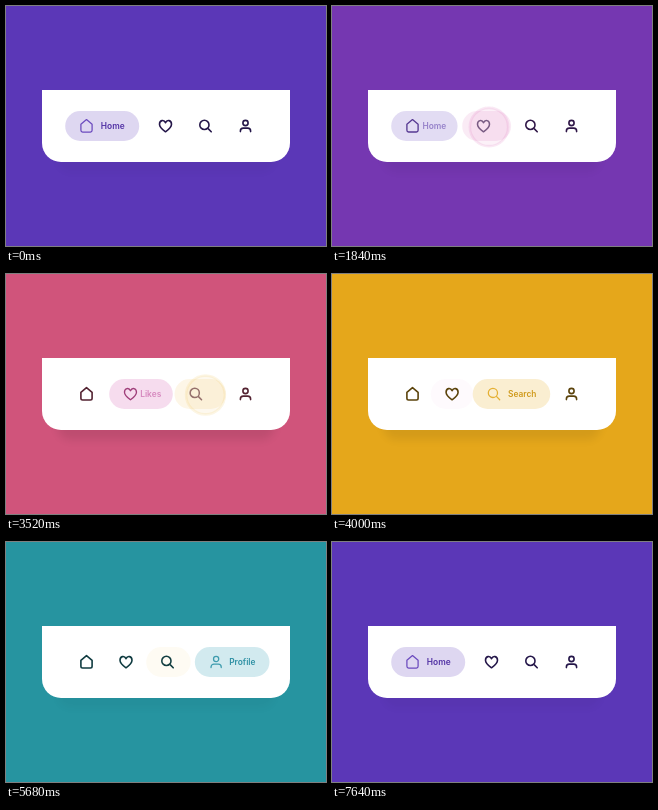
Write an HTML page that moves like this. It is 320 px wide and 240 px high and loops after 8000 ms.

```html
<!DOCTYPE html>
<html lang="en">
<head>
<meta charset="utf-8">
<title>Tab bar</title>
<style>
  html, body { margin: 0; width: 100%; height: 100%; overflow: hidden; }
  svg { display: block; width: 100vw; height: 100vh; }
  text { font: 600 8.4px Inter, "Open Sans", sans-serif; }
  .icon { fill: none; stroke-linecap: round; stroke-linejoin: round; }
</style>
</head>
<body>
<svg viewBox="0 0 320 240">
  <defs>
    <filter id="soft" x="-20%" y="-60%" width="140%" height="220%">
      <feGaussianBlur stdDeviation="4"/>
    </filter>
  </defs>
  <rect id="back" width="320" height="240"/>
  <rect id="shadow" x="51" y="124" width="218" height="42" rx="14" filter="url(#soft)"/>
  <path d="M36 84H284V137a19 19 0 0 1-19 19H55a19 19 0 0 1-19-19Z" fill="#fff"/>
  <g id="pills"></g>
  <circle id="ripple" cy="121" stroke-width="2.6"/>
  <g id="items"></g>
</svg>
<script>
const LOOP = 8000, MOVE = 720, RIPPLE = 450, LEAD = 30;

// Icons are drawn around their own centre.
const tabs = [
  { label: 'Home', rgb: [91, 55, 183], width: 74, shade: .03,
    icon: 'M-5.6-1.7 0-6.4 5.6-1.7V4.3a1.7 1.7 0 0 1-1.7 1.7H-3.9a1.7 1.7 0 0 1-1.7-1.7Z' },
  { label: 'Likes', rgb: [201, 55, 157], width: 71, shade: .09,
    icon: 'M0 5.8C-3.2 3.5-6 1.2-6-1.8-6-5.8-1.6-6.8 0-3.3 1.6-6.8 6-5.8 6-1.8 6 1.2 3.2 3.5 0 5.8Z' },
  { label: 'Search', rgb: [229, 169, 25], width: 78, shade: .07,
    icon: 'M3.5-1.1a4.6 4.6 0 1 1-9.2 0a4.6 4.6 0 1 1 9.2 0M2.4 2.4 5.7 5.8' },
  { label: 'Profile', rgb: [24, 146, 170], width: 77, shade: .03,
    icon: 'M2.6-3a2.6 2.6 0 1 1-5.2 0a2.6 2.6 0 1 1 5.2 0M-5.1 5.6V5a2.9 2.9 0 0 1 2.9-2.9H2.2A2.9 2.9 0 0 1 5.1 5v.6' }
];

// Icon centres while each tab is open.
const layout = [
  [80.5, 159.5, 199.5, 239.5],
  [80.5, 126, 199.5, 239.5],
  [80.5, 120, 161.5, 239.5],
  [80.5, 120, 161.5, 208]
];

const taps = [
  { at: 1715, to: 1, x: 157 },
  { at: 3390, to: 2, x: 199.5 },
  { at: 5190, to: 3, x: 239 },
  { at: 6870, to: 0, x: 80.5 }
];

const $ = id => document.getElementById(id);
const lerp = (a, b, p) => a + (b - a) * p;
const mix = (a, b, p) => a.map((v, i) => lerp(v, b[i], p));
const css = (c, alpha = 1) => `rgba(${c.map(Math.round)},${alpha})`;
const clamp = v => Math.min(1, Math.max(0, v));

function add(parent, name, attrs) {
  const el = document.createElementNS('http://www.w3.org/2000/svg', name);
  set(el, attrs);
  return parent.appendChild(el);
}

function set(el, attrs) {
  for (const key in attrs) el.setAttribute(key, attrs[key]);
}

// The standard CSS "ease" curve.
function ease(x) {
  if (x <= 0 || x >= 1) return clamp(x);
  const bez = (a, b, u) => 3 * a * u * (1 - u) ** 2 + 3 * b * u * u * (1 - u) + u ** 3;
  let lo = 0, hi = 1;
  for (let i = 0; i < 20; i++) {
    const u = (lo + hi) / 2;
    if (bez(.25, .25, u) < x) lo = u; else hi = u;
  }
  return bez(.1, 1, lo);
}

for (const tab of tabs) {
  tab.pill = add($('pills'), 'rect', { y: 105, height: 30, rx: 15, fill: css(tab.rgb) });
  tab.path = add($('items'), 'path', { d: tab.icon, class: 'icon' });
  tab.text = add($('items'), 'text', { y: 123, fill: css(mix(tab.rgb, [0, 0, 0], .1)) });
  tab.text.textContent = tab.label;
}

function drawRipple(t) {
  const tap = taps.find(k => t >= k.at - LEAD && t < k.at - LEAD + RIPPLE);
  if (!tap) return set($('ripple'), { opacity: 0 });
  const p = (t - tap.at + LEAD) / RIPPLE;
  const rgb = tabs[tap.to].rgb;
  set($('ripple'), {
    cx: tap.x,
    r: 10 + 16 * (1 - (1 - p) ** 2),
    fill: css(rgb, .08),
    stroke: css(rgb, .12),
    opacity: Math.sin(Math.PI * p)
  });
}

function draw(t) {
  const tap = taps.filter(k => k.at <= t).pop();
  const to = tap ? tap.to : 0;
  const from = tap ? (to + 3) % 4 : 0;
  const p = tap ? ease((t - tap.at) / MOVE) : 1;
  const back = mix(tabs[from].rgb, tabs[to].rgb, p);
  const dark = back.map(v => v * .4);

  set($('back'), { fill: css(back) });
  set($('shadow'), { opacity: lerp(tabs[from].shade, tabs[to].shade, p) });

  tabs.forEach((tab, i) => {
    const open = i === to ? p : i === from ? 1 - p : 0;
    const x = lerp(layout[from][i], layout[to][i], p);
    const dip = i === to ? .45 * Math.sin(Math.PI * p) : 0;
    set(tab.pill, {
      x: x - 21.3,
      width: lerp(42, tab.width, open),
      opacity: .2 * Math.sqrt(open)
    });
    set(tab.path, {
      transform: `translate(${x} 120)`,
      stroke: css(mix(dark, tab.rgb, open * open)),
      'stroke-width': lerp(1.6, 1.25, open),
      opacity: 1 - .12 * open - dip
    });
    set(tab.text, { x: x + 14.3 - 18 * (1 - open), opacity: clamp(2 * open - 1) });
  });
  drawRipple(t);
}

const start = performance.now();
function tick() {
  draw((performance.now() - start) % LOOP);
  requestAnimationFrame(tick);
}
tick();
</script>
</body>
</html>
```
